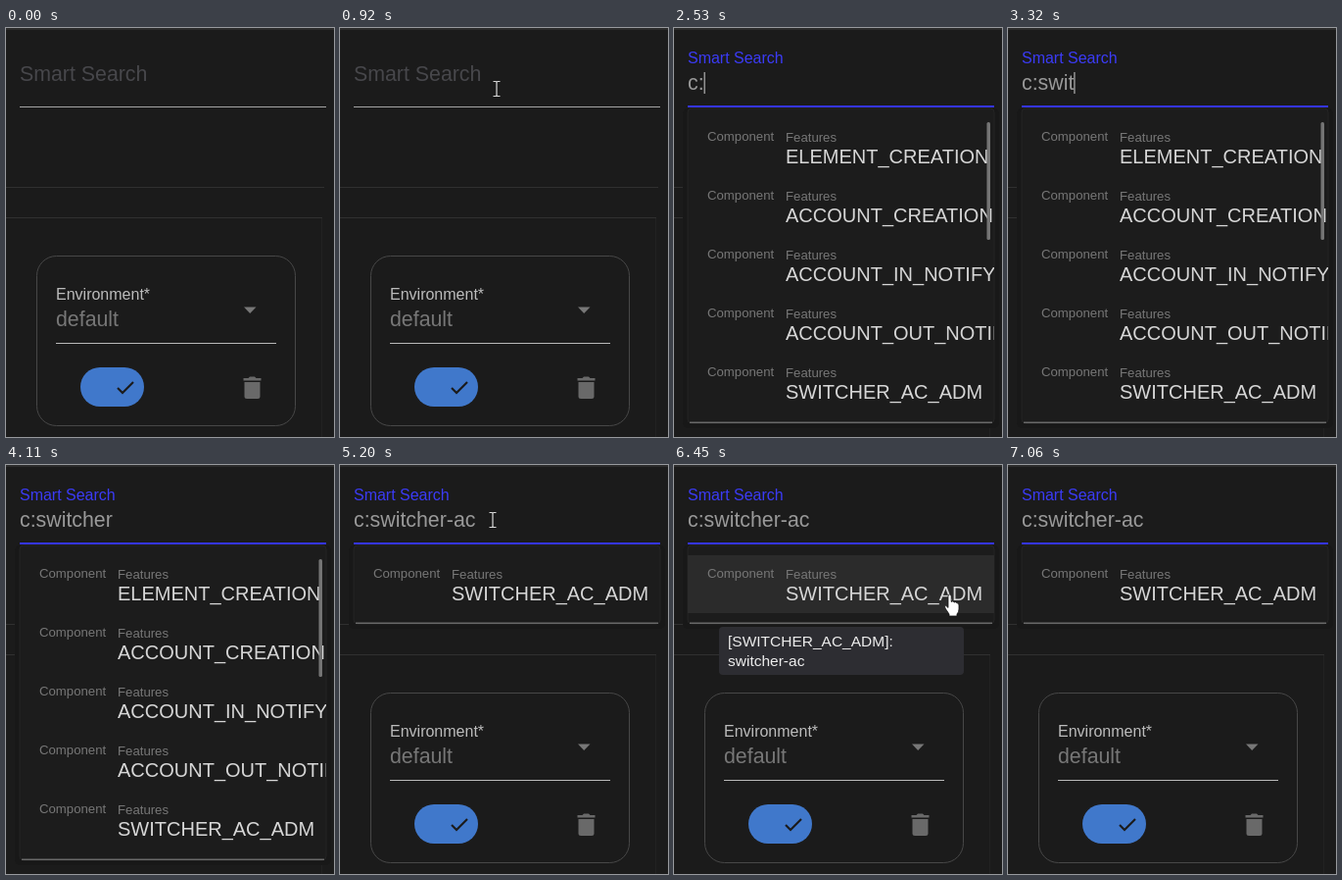
An HTML page that plays this animation: 335x417 px, repeating every 7210 ms.

```html
<!DOCTYPE html>
<html lang="en">
<head>
<meta charset="utf-8">
<title>Smart search</title>
<style>
html, body { margin: 0; width: 100%; height: 100%; overflow: hidden; background: #1b1b1b; }
svg { display: block; width: 100%; height: 100%; }
text { font-family: "Liberation Sans", Arial, sans-serif; white-space: pre; }
.kind, .group { font-size: 13.2px; fill: #777; }
.name { font-size: 20px; fill: #d6d6d6; }
.field { font-size: 21.33px; }
</style>
</head>
<body>
<svg viewBox="0 0 335 417" xmlns="http://www.w3.org/2000/svg">
  <defs><clipPath id="panelClip"><rect x="14" y="82" width="313" height="322"/></clipPath></defs>
  <rect width="335" height="417" fill="#1b1b1b"/>
  <rect width="335" height="2" fill="#2b2b2b"/>

  <g id="page">
    <path d="M0 162.5H325M0 193.5H323" stroke="#303030"/>
    <path d="M322.5 194V417" stroke="#222"/>
    <rect x="31.5" y="232.5" width="264" height="173" rx="20" fill="none" stroke="#474747"/>
    <text x="51" y="277" font-size="16" fill="#bcbcbc">Environment*</text>
    <text class="field" x="51" y="304" fill="#777">default</text>
    <path d="M51 321.5H276" stroke="#b8b8b8"/>
    <path d="M243 284.5H255.5L249.2 291Z" fill="#777"/>
    <rect x="76" y="346" width="65" height="40" rx="20" fill="#4078cb"/>
    <path d="M114 367L119 372L130 361" fill="none" stroke="#1b1b1b" stroke-width="2.2"/>
    <path d="M242.5 357H247.5L249 355.5H254L255.5 357H260.5V359.5H242.5ZM243.5 361H259.5V375.5Q259.5 378 257 378H246Q243.5 378 243.5 375.5Z" fill="#696969"/>
  </g>

  <path d="M14 80.5H327" stroke="#a5a5a5"/>
  <rect id="ripple" y="79" height="2" fill="#3535f0"/>
  <text id="label" class="field">Smart Search</text>
  <text id="input" class="field" x="14" y="63" fill="#999"></text>
  <rect id="caret" y="45" width="1.2" height="22"/>

  <g id="panel">
    <rect id="shade" x="9" y="82" width="323" rx="5" fill="#181818"/>
    <rect id="sheet" x="14" y="82" width="313" rx="4" fill="#1c1c1c" stroke="#242424"/>
    <path id="edge" stroke="#686868" stroke-width="1.6"/>
    <rect id="hover" x="14" y="92" width="313" height="59" fill="#2b2b2b"/>
    <g id="rows" clip-path="url(#panelClip)"></g>
    <rect id="thumb" x="319.5" y="96" width="3.5" rx="1.5"/>
  </g>

  <g id="tip">
    <rect x="46" y="165" width="250" height="49" rx="4" fill="#2d2d32"/>
    <g font-size="15.5" fill="#ececec">
      <text x="55" y="185">[SWITCHER_AC_ADM]:</text>
      <text x="55" y="205">switcher-ac</text>
    </g>
  </g>

  <g id="mouse">
    <path id="beam" d="M-3.5 -7.5H-1Q0 -7.5 0 -6.5Q0 -7.5 1 -7.5H3.5M0 -6.5V6.5M-3.5 7.5H-1Q0 7.5 0 6.5Q0 7.5 1 7.5H3.5" fill="none" stroke="#d8d8d8" stroke-width="1.2"/>
    <path id="arrow" d="M0 0V16L4 12.5L6.5 18L9 17L6.5 11.5H11.5Z" fill="#fff" stroke="#111" stroke-width=".8"/>
    <path id="hand" d="M-4 -9Q-4 -11 -2.4 -11Q-.8 -11 -.8 -9V-3.5Q1 -5 2.2 -3Q4 -4 5 -2.2Q7 -2.5 7 0V4Q7 7 5 9V11H-3V9L-7 3Q-8 .5 -6.3 .3L-4 2.5Z" fill="#fff" stroke="#111" stroke-width=".8"/>
  </g>
</svg>
<script>
const LOOP = 7210;
const $ = id => document.getElementById(id);
const set = (id, attrs) => { for (const k in attrs) $(id).setAttribute(k, attrs[k]); };
const show = (id, on) => set(id, { opacity: +on });
const mix = (a, b, p) => a + (b - a) * p;

// Latest entry whose start time has passed.
const at = (track, t) => track.filter(k => k[0] <= t).pop();

const typing = [[0, ""], [2000, "c"], [2260, "c:"], [2660, "c:s"], [2790, "c:sw"], [3190, "c:swi"],
  [3320, "c:swit"], [3450, "c:switch"], [3710, "c:switche"], [4110, "c:switcher"],
  [4240, "c:switcher-"], [4380, "c:switcher-a"], [4770, "c:switcher-ac"]];

const caret = [[0, 0], [1060, 1], [1600, 0], [2000, 1], [3190, 0], [3320, 1], [4110, 0],
  [4240, 1], [5060, 0], [5520, 1], [6280, 0], [6600, 1], [7060, 0]];

const focus = [[0, 0, 0], [1060, 0, 0.35], [1190, 0.4, 0.8], [1330, 1, 1]];

const open = [[0, 0], [1190, 0.5], [1330, 1]];
const lists = [[0, "all"], [2260, "components"], [4770, "match"]];
const hover = [[0, 0], [5520, 1], [6600, 0]];
const tip = [[0, 0], [5670, 0.5], [5820, 1], [6600, 0.7], [6750, 0.3], [6890, 0]];

const mouse = [[0, ""], [400, "arrow", 290, 330], [530, "arrow", 262, 262], [660, "arrow", 222, 180],
  [790, "arrow", 184, 104], [920, "beam", 160, 62], [1060, "beam", 155, 56], [2000, ""],
  [5200, "beam", 156, 56], [5380, "beam", 180, 76], [5520, "hand", 224, 112], [5670, "hand", 253, 128],
  [5820, "hand", 260, 133], [6450, "hand", 284, 143], [6600, "arrow", 312, 172],
  [6750, "arrow", 326, 206], [6890, ""]];

const component = name => ["Component", name, 114];
const data = {
  all: {
    bottom: 403, thumb: 51, tone: "#585858",
    rows: [["Group", "Features", 83], ["Group", "Test Project", 83], ["Group", "Features UI", 83],
      ["Switcher", "ELEMENT_CREATION", 98], ["Switcher", "ACCOUNT_CREATION", 98]]
  },
  components: {
    bottom: 403, thumb: 120, tone: "#747474",
    rows: ["ELEMENT_CREATION", "ACCOUNT_CREATION", "ACCOUNT_IN_NOTIFY", "ACCOUNT_OUT_NOTIFY",
      "SWITCHER_AC_ADM"].map(component)
  },
  match: { bottom: 162, thumb: 0, tone: "none", rows: [component("SWITCHER_AC_ADM")] }
};

const label = (cls, x, y, s) => `<text class="${cls}" x="${x}" y="${y}">${s}</text>`;
const row = ([kind, name, x], i) => {
  const y = i * 60;
  return label("kind", 34, y + 115, kind) +
    (kind === "Group" ? "" : label("kind", x, y + 116, "Features")) +
    label("name", x, y + 138, name);
};

let current = "";
function fillList(key) {
  if (key === current) return;
  current = key;
  const { bottom, thumb, tone, rows } = data[key];
  $("rows").innerHTML = rows.map(row).join("");
  set("shade", { height: bottom - 77 });
  set("sheet", { height: bottom - 82 });
  set("edge", { d: `M16 ${bottom - 0.8}H325` });
  set("thumb", { height: thumb, fill: tone });
}

function draw(t) {
  const [, lift, spread] = at(focus, t);
  set("label", {
    transform: `translate(14 ${mix(54, 36, lift)}) scale(${mix(1, 0.75, lift)})`,
    fill: t < 1060 ? "#47474b" : "#3b3bf6"
  });
  set("ripple", { x: 170.5 - 156.5 * spread, width: 313 * spread });

  const text = at(typing, t)[1];
  $("input").textContent = text;
  const end = text ? $("input").getComputedTextLength() : 0;
  set("caret", { x: 14 + end, fill: text ? "#b0b0b0" : "#4545f5" });
  show("caret", at(caret, t)[1]);

  fillList(at(lists, t)[1]);
  show("panel", at(open, t)[1]);
  show("hover", at(hover, t)[1]);
  show("tip", at(tip, t)[1]);

  const [, shape, x = 0, y = 0] = at(mouse, t);
  for (const id of ["beam", "arrow", "hand"]) show(id, id === shape);
  set("mouse", { transform: `translate(${x} ${y})` });
}

const start = performance.now();
function tick() {
  draw((performance.now() - start) % LOOP);
  requestAnimationFrame(tick);
}
tick();
</script>
</body>
</html>
```
